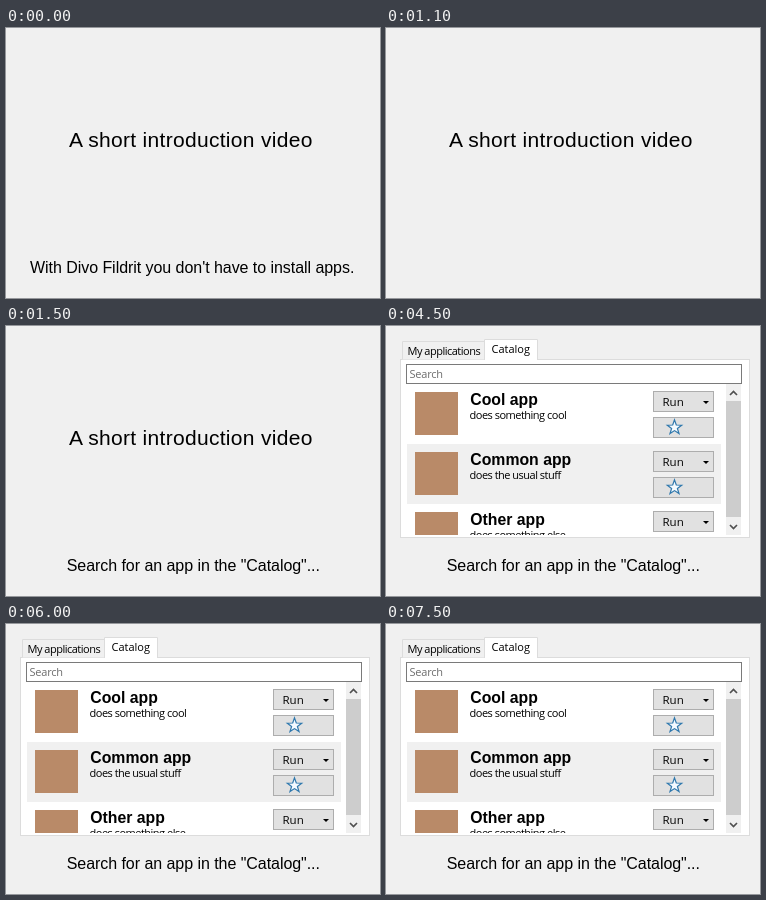
An HTML page for the animation above (8000 ms loop, 374 by 270 pixels).

```html
<!DOCTYPE html>
<html lang="en">
<head>
<meta charset="utf-8">
<title>Introduction</title>
<style>
  html, body { margin: 0; width: 100%; height: 100%; overflow: hidden; background: #f0f0f0; }
  svg { display: block; }
  text { white-space: pre; }
  .caption { font: 16px "Liberation Sans", Arial, sans-serif; letter-spacing: -.05px; }
  .title { font: 21px "Liberation Sans", Arial, sans-serif; letter-spacing: .3px; }
  .app { font: bold 15.8px "Liberation Sans", Arial, sans-serif; }
  .ui { font: 11px "Open Sans", "Noto Sans", sans-serif; }
  .tight { letter-spacing: -.5px; }
  .button { fill: #e1e1e1; stroke: #adadad; }
  .edge { stroke: #dcdcdc; }
  .chevron { fill: none; stroke: #505050; stroke-width: 1.7; }
</style>
</head>
<body>
<svg width="374" height="270" viewBox="0 0 374 270">
  <defs>
    <clipPath id="list"><rect x="20" y="58" width="320" height="151"/></clipPath>
  </defs>

  <text id="title" class="title" x="63" y="119">A short introduction video</text>

  <g id="window">
    <rect class="edge" x="14.5" y="33.5" width="349" height="178" fill="#fff"/>
    <path class="edge" d="M16.5 33.5V15.5H98.5V33.5" fill="#f0f0f0"/>
    <path class="edge" d="M98.5 34V13.5H151.5V34" fill="#fff"/>
    <text class="ui tight" x="21.5" y="29">My applications</text>
    <text class="ui" x="105.5" y="27">Catalog</text>
    <rect x="20.5" y="38.5" width="335" height="19" fill="#fff" stroke="#7a7a7a"/>
    <text class="ui" x="23.5" y="52" fill="#6d6d6d" letter-spacing="-.2">Search</text>
    <g id="rows" clip-path="url(#list)"></g>
    <rect x="340" y="58" width="15" height="151" fill="#f0f0f0"/>
    <rect x="340" y="75" width="15" height="116" fill="#cdcdcd"/>
    <path class="chevron" d="M344 69l3.5-3.5 3.5 3.5M344 199l3.5 3.5 3.5-3.5"/>
  </g>

  <path id="pointer" d="M0 45.5H6V42H8L13 47 8 52H6V48.5H0Z" fill="#f00"/>
  <text id="intro" class="caption" x="24" y="245">With Divo Fildrit you don't have to install apps.</text>
  <text id="search" class="caption" x="60.7" y="245">Search for an app in the "Catalog"...</text>
</svg>

<script>
const LOOP = 8000;

// [start, end] of each part's visibility in ms
const schedule = {
  intro: [0, 500],
  title: [0, 4500],
  search: [1500, LOOP],
  window: [4500, LOOP],
  pointer: [7000, 7500],
};

const apps = [
  ["Cool app", "does something cool"],
  ["Common app", "does the usual stuff"],
  ["Other app", "does something else"],
];

const star = Array.from({ length: 10 }, (_, i) => {
  const r = i % 2 ? 3.1 : 7.6, a = i * Math.PI / 5;
  return `${(288.5 + r * Math.sin(a)).toFixed(1)},${(43.5 - r * Math.cos(a)).toFixed(1)}`;
}).join(" ");

const row = ([name, summary], i) => `
  <g transform="translate(0 ${58 + 60 * i})">
    ${i % 2 ? '<rect x="21" width="314" y="0" height="60" fill="#f0f0f0"/>' : ""}
    <rect x="29" y="8" width="43" height="43" fill="#b98a68"/>
    <text class="app" x="84.3" y="21">${name}</text>
    <text class="ui tight" x="83.5" y="35">${summary}</text>
    <rect class="button" x="267.5" y="7.5" width="60" height="20"/>
    <text class="ui" x="276.5" y="22" style="font-size:11.5px">Run</text>
    <path d="M317 17h6l-3 3z"/>
    <rect class="button" x="267.5" y="33.5" width="60" height="20"/>
    <polygon points="${star}" fill="#f4faff" stroke="#2f78ad" stroke-width="1.2"/>
  </g>`;

document.getElementById("rows").innerHTML = apps.map(row).join("");

const parts = Object.entries(schedule).map(([id, span]) => [document.getElementById(id), ...span]);
const start = performance.now();

function draw() {
  const t = (performance.now() - start) % LOOP;
  for (const [part, from, to] of parts) {
    part.style.display = t >= from && t < to ? "" : "none";
  }
  requestAnimationFrame(draw);
}
draw();
</script>
</body>
</html>
```
